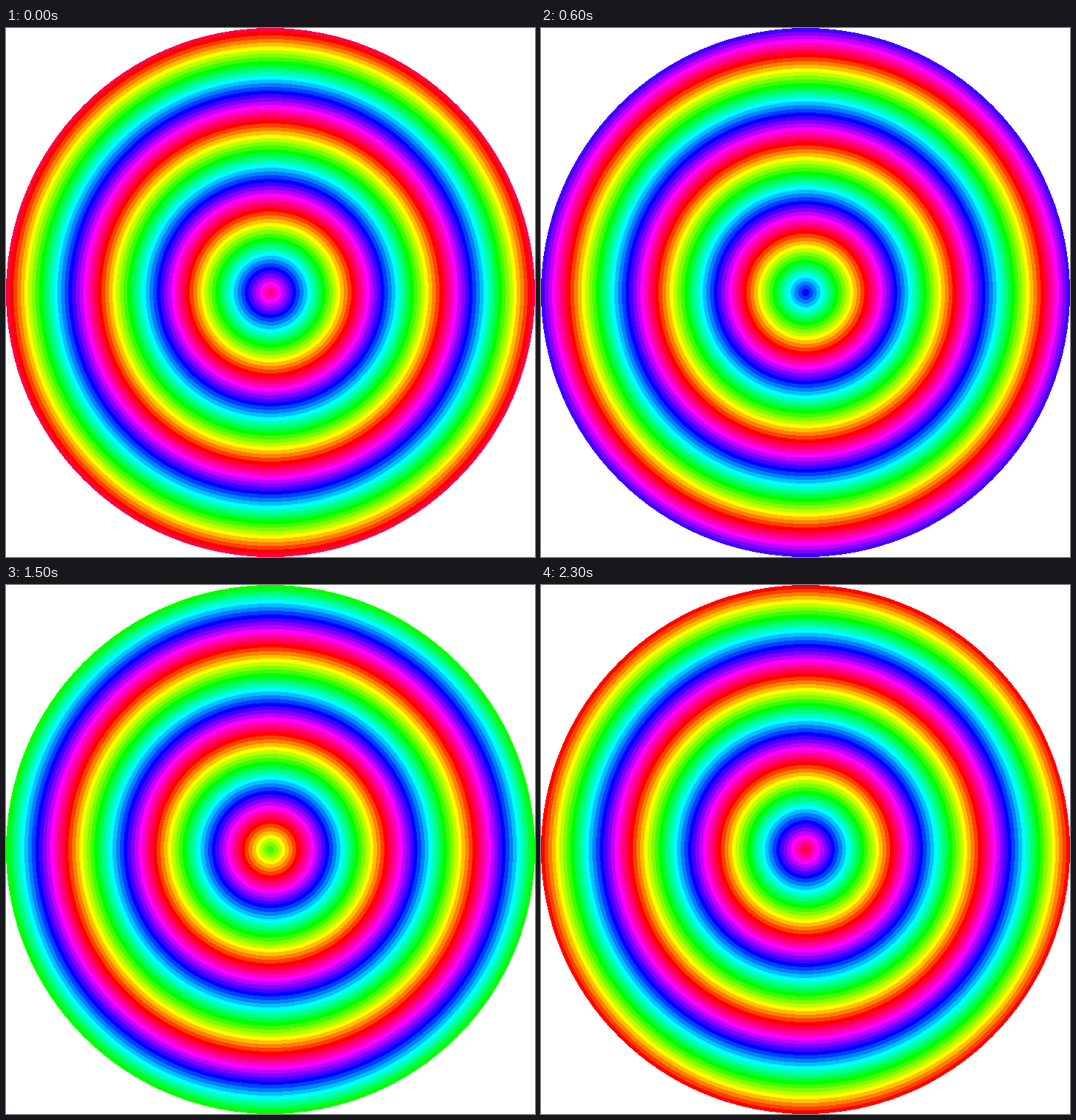
An HTML page for the animation above (2400 ms loop, 720 by 720 pixels).

```html
<!DOCTYPE html>
<html lang="en">
<head>
<meta charset="utf-8">
<title>Rainbow rings</title>
<style>
  html, body { margin: 0; width: 100%; height: 100%; overflow: hidden; background: #fff; }
  svg { display: block; width: 100%; height: 100%; }
</style>
</head>
<body>
<svg id="stage" viewBox="0 0 720 720" shape-rendering="crispEdges"></svg>
<script>
const STEP_MS = 100;
const STEPS = 24;
const HUE_STEP = 360 / STEPS;
const RADIUS = 360;
const RING_WIDTH = 5;

const stage = document.getElementById('stage');

// Nested discs, largest first, so each one shows as a ring.
const rings = Array.from({ length: RADIUS / RING_WIDTH }, (_, i) => {
  const disc = document.createElementNS('http://www.w3.org/2000/svg', 'circle');
  disc.setAttribute('cx', RADIUS);
  disc.setAttribute('cy', RADIUS);
  disc.setAttribute('r', RADIUS - i * RING_WIDTH);
  return stage.appendChild(disc);
});

// Every step moves the colours one ring inward.
function draw(step) {
  rings.forEach((ring, i) => {
    const hue = ((i - 1 - step + STEPS) % STEPS) * HUE_STEP;
    ring.setAttribute('fill', `hsl(${hue}, 100%, 50%)`);
  });
}

let start = null;
let shown = 0;

function tick(now) {
  start ??= now;
  const step = Math.floor((now - start) / STEP_MS) % STEPS;
  if (step !== shown) draw(shown = step);
  requestAnimationFrame(tick);
}

draw(shown);
requestAnimationFrame(tick);
</script>
</body>
</html>
```
